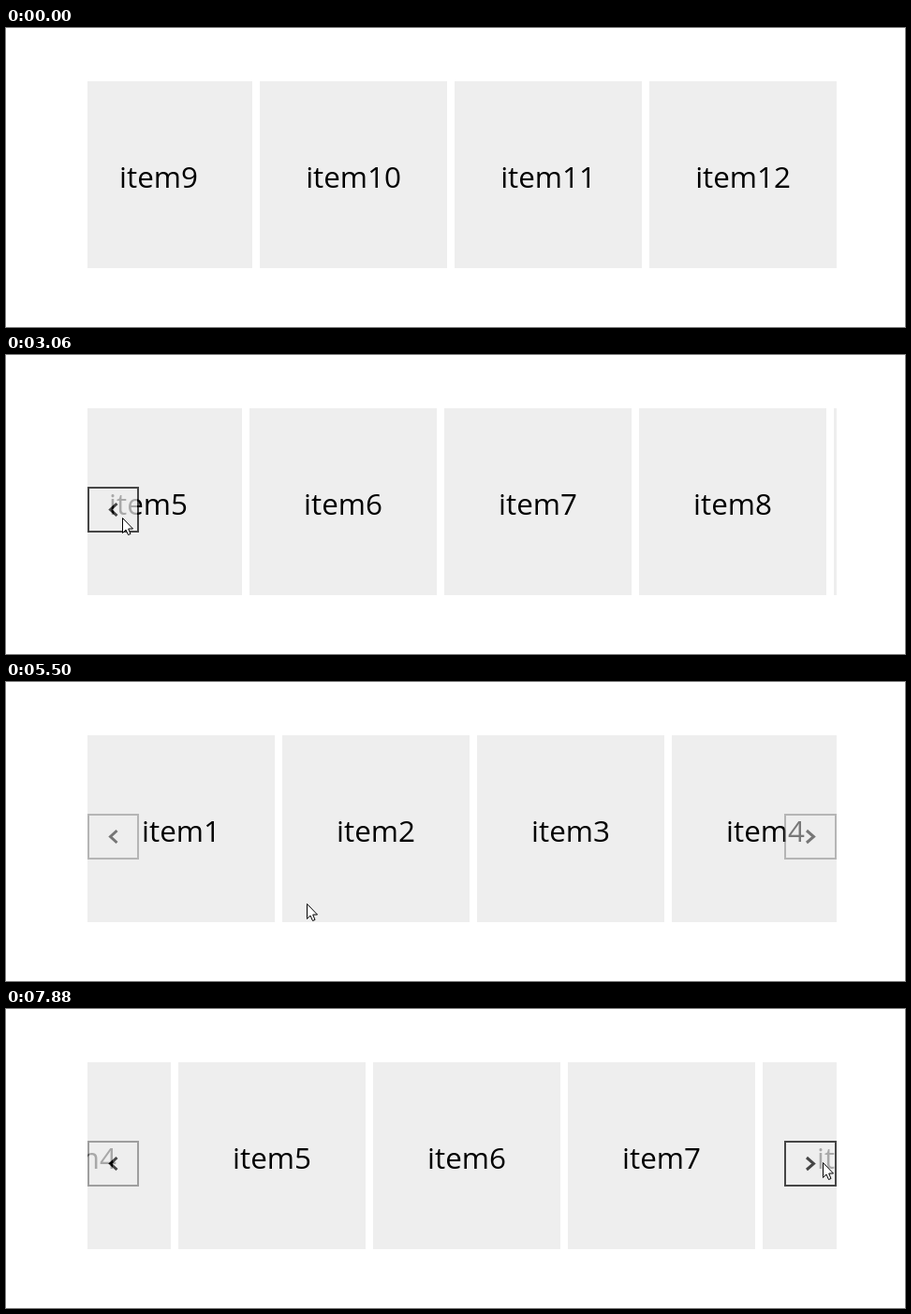
Animation, 960 px wide and 320 px high, one loop 8 s. Source, as an HTML page:

```html
<!DOCTYPE html>
<html lang="en">
<head>
<meta charset="utf-8">
<title>Carousel</title>
<style>
  html, body { margin: 0; width: 100%; height: 100%; overflow: hidden; background: #fff; }
  svg { display: block; }
  text { font: 31.4px "Open Sans", "Noto Sans", sans-serif; text-anchor: middle; }
  .button rect { fill: #efefef; stroke: #7d7d7d; stroke-width: 2; }
  .button.hover rect { stroke: #000; }
  .button path { fill: none; stroke: #000; stroke-width: 3; }
</style>
</head>
<body>
<svg width="960" height="320" viewBox="0 0 960 320">
  <clipPath id="view"><rect x="87" y="57" width="800" height="200"/></clipPath>
  <g clip-path="url(#view)"><g id="track"></g></g>
  <g class="button" id="prev">
    <rect x="88" y="142" width="53" height="47"/>
    <path d="M118.5 159L111.5 165.5L118.5 172"/>
  </g>
  <g class="button" id="next">
    <rect x="832" y="142" width="54" height="47"/>
    <path d="M855 159L862.5 165.5L855 172"/>
  </g>
  <path id="cursor" d="M.5 .5V16.5L4 13L6.5 18.5L9 17.5L6.7 12H11.5Z" fill="#fff" stroke="#000"/>
</svg>
<script>
const LOOP = 8000, UPDATE = 146, ITEMS = 12, PITCH = 208;
const MAX_SCROLL = ITEMS * PITCH - 8 - 800;
const $ = id => document.getElementById(id);

// Cursor strokes curve through "via" to "to"; the others are scrolls
const home = [375, 340];
const moves = [
  { start: 740, end: 1480, via: [412, 220], to: [416, 199] },
  { start: 1780, end: 2510, via: [250, 235], to: [124, 174] },
  { start: 2790, end: 3360 },
  { start: 4370, end: 4920, via: [150, 235], to: [185, 340] },
  { start: 5220, end: 6230, via: [360, 165], to: [567, 192] },
  { start: 6380, end: 7110, via: [761, 197], to: [872, 164] },
  { start: 7580, end: 7880 }
];

const ramp = (t, start, length) => Math.min(1, Math.max(0, (t - start) / length));
const ease = p => (1 - Math.cos(Math.PI * p)) / 2;
const glide = (t, start) => ease(ramp(t, start, 570));
const fade = (t, start) => ramp(t, start, 250);

// The picture updates in even steps during a move and rests in between
function sample(t) {
  const { start, end } = moves.findLast(m => m.start <= t) || { start: 0, end: 0 };
  const step = (end - start) / Math.round((end - start) / UPDATE) || 1;
  return Math.min(end, start + Math.floor((t - start + 16) / step) * step);
}

function cursorAt(t) {
  let at = home;
  for (const { start, end, via, to } of moves) {
    if (!to || t < start) continue;
    const p = ramp(t, start - UPDATE, end - start + UPDATE), q = 1 - p;
    at = at.map((a, i) => Math.round(q * q * a + 2 * q * p * via[i] + p * p * to[i]));
  }
  return at;
}

function showButton(id, visible, [x, y], left, right) {
  $(id).style.opacity = 0.7 * visible;
  $(id).classList.toggle("hover", x >= left && x < right && y >= 141 && y < 190);
}

function draw(time) {
  const t = sample(time % LOOP);
  const cursor = cursorAt(t);
  const scroll = MAX_SCROLL * (1 - glide(t, 2795) + glide(t, 7618.5));
  const away = fade(t, 4560) - fade(t, 5330);

  $("track").setAttribute("transform", `translate(${-Math.round(scroll)})`);
  $("cursor").setAttribute("transform", `translate(${cursor})`);
  showButton("prev", fade(t, 980) - away, cursor, 87, 142);
  showButton("next", fade(t, 3110) - away, cursor, 831, 887);
  requestAnimationFrame(draw);
}

for (let i = 0; i < ITEMS; i++) {
  const x = 87 + i * PITCH;
  $("track").innerHTML += `<rect x="${x}" y="57" width="200" height="200" fill="#eee"/>
    <text x="${x + 100}" y="171">item${i + 1}</text>`;
}
requestAnimationFrame(draw);
</script>
</body>
</html>
```
